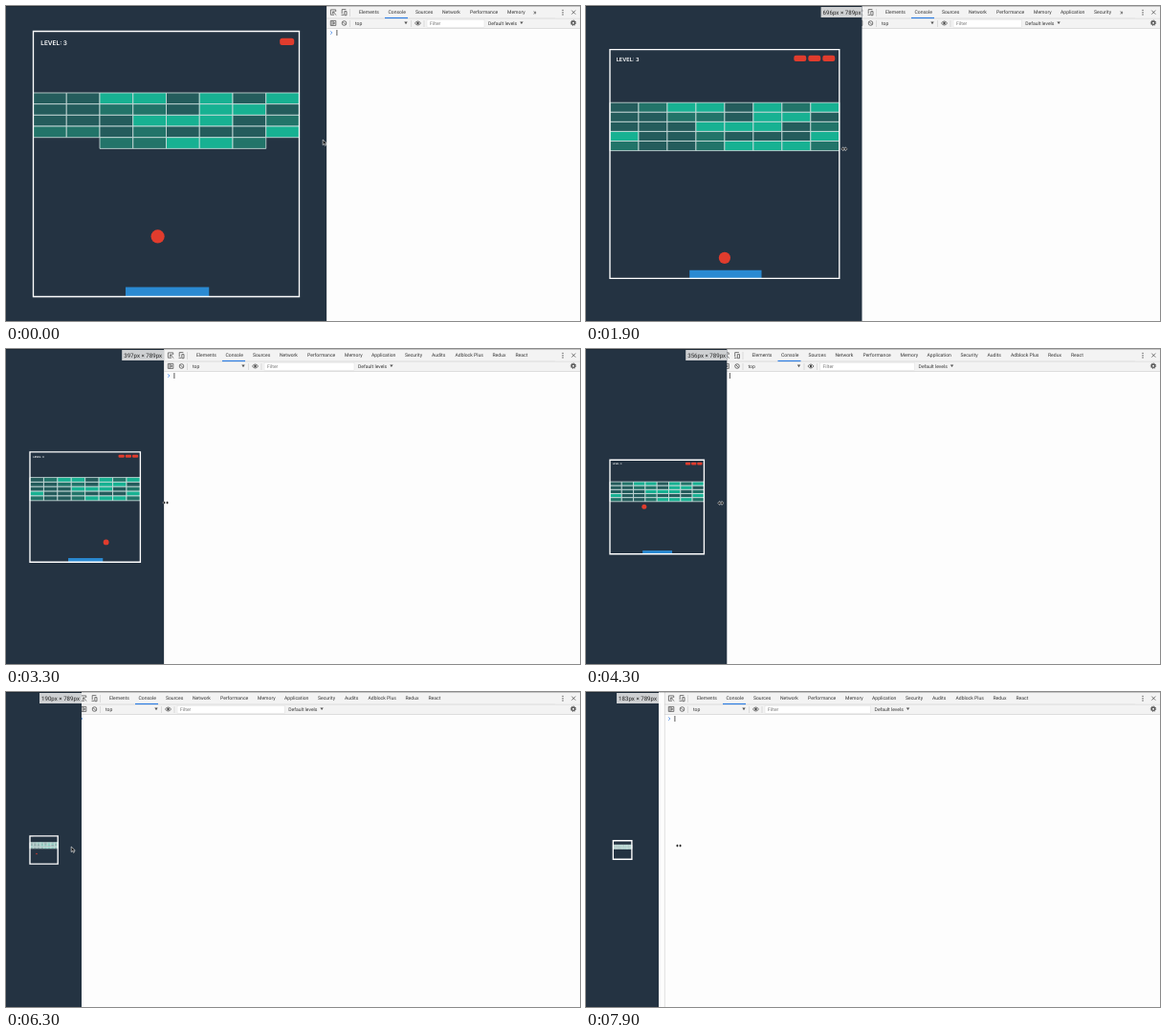
An HTML page for the animation above (8 s loop, 600 px wide and 330 px high).

```html
<!DOCTYPE html>
<html lang="en">
<head>
<meta charset="utf-8">
<title>Resizing a brick game</title>
<style>
  html, body { margin: 0; width: 100%; height: 100%; overflow: hidden; background: #fff; }
  svg { display: block; }
  text { font-family: Roboto, "Liberation Sans", sans-serif; text-rendering: geometricPrecision; white-space: pre; }
  .ui { font-size: 5.05px; fill: #333; }
  .icon { fill: none; stroke: #555; stroke-width: .8; }
  .thin { stroke: #ccc; stroke-width: .6; }
  .brick { stroke: #d3e4e2; stroke-width: .8; vector-effect: non-scaling-stroke; }
  .h0 { display: none; }
  .h1 { fill: #245c5c; }
  .h2 { fill: #227469; }
  .h3 { fill: #17b192; }
  .red { fill: #e03c2d; }
  .level { font: 600 2.35px Inter, "Open Sans", sans-serif; fill: #fff; }
</style>
</head>
<body>
<svg id="stage" width="600" height="330" viewBox="0 0 600 330">
  <rect width="600" height="330" fill="#fdfdfd"/>

  <g id="tools">
    <rect width="600" height="23.5" fill="#f3f3f3"/>
    <path class="thin" d="M0 13H600M0 23.5H600M.3 0V330M24.5 3V11M24.5 15V22M88.5 15V22M102 15V22"/>
    <rect x="61" y="11.9" width="24" height="1.2" fill="#2f7de1"/>
    <g class="icon">
      <path d="M8 9.2H4.4V3.9H9.7V6M6.6 6L10.3 9.6M6.6 8.3V6H8.9"/>
      <path d="M16.2 8V3.6H20.4M15.5 9.3H18M18.8 5.6H21V9.7H18.8Z"/>
      <path d="M4.3 15.4H9.8V20.4H4.3ZM6 15.4V20.4M7.3 16.7L8.8 17.9L7.3 19.1Z"/>
      <circle cx="18.5" cy="18" r="2.3"/><path d="M16.9 16.4L20.1 19.6"/>
      <path d="M92.4 18Q95.5 14 98.6 18Q95.5 22 92.4 18Z"/>
    </g>
    <circle cx="95.5" cy="18" r="1.2" fill="#444"/>
    <text class="ui" x="30" y="19.7">top</text>
    <path d="M81.3 16.6H84.7L83 19.3Z" fill="#555"/>
    <rect id="filter" x="105" y="14.2" height="8" fill="#fff" stroke="#ddd" stroke-width=".5"/>
    <text class="ui" x="108" y="19.7" style="fill:#757575">Filter</text>
    <g id="levels">
      <text class="ui" y="19.5">Default levels</text>
      <path d="M33.2 16.5H36.6L34.9 19.1Z" fill="#555"/>
    </g>
    <path d="M4.2 26.3L5.9 28L4.2 29.7" fill="none" stroke="#3b82e8" stroke-width=".8"/>
    <path id="caret" d="M10.9 25V31" stroke="#333" stroke-width=".8"/>
    <g id="tabs"></g>
  </g>

  <rect x="574" y="1" width="26" height="11.5" fill="#f3f3f3"/>
  <g fill="#555">
    <circle cx="582" cy="4.4" r=".7"/><circle cx="582" cy="6.7" r=".7"/><circle cx="582" cy="9" r=".7"/>
  </g>
  <g class="icon">
    <path d="M591.3 4.6L595.3 8.6M595.3 4.6L591.3 8.6"/>
    <circle cx="593" cy="17.7" r="1.7" stroke-width="1.3"/>
    <circle cx="593" cy="17.7" r="2.7" stroke-dasharray="1.06" stroke-width="1"/>
  </g>

  <svg id="page" height="330">
    <rect width="600" height="330" fill="#243342"/>
    <g id="game">
      <g id="bricks"></g>
      <text class="level" x="2.8" y="5.1">LEVEL: 3</text>
      <g id="lives" class="red"></g>
      <rect id="paddle" x="34.7" y="96.4" width="31.4" height="3.6" fill="#2a8ad2"/>
      <circle id="ball" class="red" r="2.55"/>
      <rect width="100" height="100" fill="none" stroke="#fff" stroke-width="1.35" vector-effect="non-scaling-stroke"/>
    </g>
    <g id="label">
      <rect y="1" width="45" height="11" fill="#cfd1d3"/>
      <text id="dims" x="2" y="9" font-size="6.15" fill="#222"></text>
    </g>
  </svg>

  <rect width="600" height="1" fill="#000" opacity=".2"/>
  <g id="mouse">
    <path id="arrow" d="M-1.3 -3V2.6L0 1.4L1 3.4L2 2.9L1.1 1H2.8Z" fill="#111" stroke="#fff" stroke-width=".6"/>
    <path id="resize" d="M-3.2 0L-1 -2V-.6H1V-2L3.2 0L1 2V.6H-1V2Z" fill="#111" stroke="#fff" stroke-width=".5"/>
  </g>
</svg>

<script>
const LOOP = 8000, STEP = 100, MAX_SIZE = 278, MARGIN = 50;
const $ = id => document.getElementById(id);

function add(parent, tag, attrs, text = "") {
  const el = document.createElementNS("http://www.w3.org/2000/svg", tag);
  for (const key in attrs) el.setAttribute(key, attrs[key]);
  el.textContent = text;
  return parent.appendChild(el);
}
const move = (id, x, y = 0, s = 1) => $(id).setAttribute("transform", `translate(${x} ${y}) scale(${s})`);
const show = (el, on) => { el.style.display = on ? "" : "none"; };

// Linear track through [time, value, value...] points; equal times make a jump.
function at(track, t) {
  let i = track.findIndex(p => p[0] > t);
  if (i < 0) return track[track.length - 1].slice(1);
  if (i === 0) return track[0].slice(1);
  const a = track[i - 1], b = track[i], k = (t - a[0]) / (b[0] - a[0]);
  return a.slice(1).map((v, j) => v + (b[j + 1] - v) * k);
}

// Tools edge, layout width and painted page edge follow the mouse with growing lag.
const toolsEdge = [[0, 335], [700, 335], [1000, 331], [1300, 322], [2500, 236], [3200, 165],
  [3700, 165], [4500, 131], [5100, 108], [5400, 102], [6300, 74], [7100, 59], [7300, 62], [7900, 82]];
const layoutWidth = [[0, 335], [1000, 335], [1300, 329.2], [2500, 250.4], [3250, 165.4], [3800, 165.4],
  [5100, 121.25], [6300, 79.2], [7200, 61.5], [7350, 61.5], [7900, 76.25]];
const pageEdge = [[0, 335], [1000, 335], [1300, 329], [2500, 248], [3250, 165], [3800, 165],
  [5100, 119], [6300, 79], [7200, 61], [7350, 61], [7900, 76]];
const mousePath = [[0, 332.5, 143], [700, 332.5, 143], [1300, 317.5, 148.5], [2500, 222.5, 151], [3200, 167, 161],
  [3700, 167, 161], [5100, 106, 162], [6300, 69.5, 165], [7100, 58, 163], [7900, 97, 161]];
const ballPath = [[0, 46.8, 77.3], [1300, 40.5, 93.6], [1500, 39.5, 91], [1500, 50, 91], [2000, 50, 91],
  [2500, 57.8, 83.7], [2700, 61, 80.8], [2700, 50, 91], [2900, 50, 91], [3300, 69, 82], [3750, 96, 69],
  [4350, 31, 48], [5100, 73, 72], [5450, 93, 83], [5450, 50, 91], [6300, 24, 64], [6750, 8, 48], [7900, 50, 91]];

const worn = "1133131311221331111333122212111300223320";
const fresh = "1233132311221331111333123112111321123332";
const hit = fresh.slice(0, 34) + "0" + fresh.slice(35);

const bricks = [...worn].map((_, i) => add($("bricks"), "rect",
  { x: i % 8 * 12.5, y: 23.2 + Math.floor(i / 8) * 4.2, width: 12.5, height: 4.2 }));
const lives = [0, 1, 2].map(i => add($("lives"), "rect",
  { x: 92.7 - i * 6.25, y: 2.6, width: 5.4, height: 2.6, rx: .9 }));

const tabs = [["Elements", 34, 55], ["Console", 64.5, 83], ["Sources", 93, 112], ["Network", 121, 141],
  ["Performance", 150, 179], ["Memory", 189, 208], ["Application", 217, 243], ["Security", 252, 271],
  ["Audits", 280, 294], ["Adblock Plus", 304.5, 334], ["Redux", 343.5, 358], ["React", 367.5, 381.5]]
  .map(([name, x, end]) => ({ x, end, el: add($("tabs"), "text", { class: "ui", x, y: 8.4 }, name) }));
const more = add($("tabs"), "text", { class: "ui", y: 8.6, style: "font-size:7.5px" }, "»");

function drawTools(t) {
  const [edge] = at(toolsEdge, t);
  move("tools", edge);
  const levelsX = 169 + (335 - edge) * .2;
  move("levels", levelsX);
  $("filter").setAttribute("width", levelsX - 109);
  show($("caret"), t % 1060 < 530);
  let hidden = tabs.findIndex(tab => edge + tab.end > 558);
  if (hidden < 0) hidden = tabs.length;
  tabs.forEach((tab, i) => show(tab.el, i < hidden));
  show(more, hidden < tabs.length);
  if (hidden < tabs.length) more.setAttribute("x", tabs[hidden].x - 1);
}

function drawGame(t) {
  const [width] = at(layoutWidth, t), [earlier] = at(layoutWidth, t - 250);
  const base = t > 7200 ? Math.min(width, earlier) : width;
  const size = Math.min(MAX_SIZE, base - MARGIN);
  const reset = t >= 1500;
  $("page").setAttribute("width", at(pageEdge, t)[0]);
  move("game", (width - size) / 2, 165.5 - size / 2, size / 100);
  const wall = !reset ? worn : t >= 4350 && t < 5450 ? hit : fresh;
  bricks.forEach((b, i) => b.setAttribute("class", "brick h" + wall[i]));
  lives.forEach((l, i) => show(l, (reset || i === 0) && size > 40));
  const [x, y] = at(ballPath, t);
  move("ball", x, y);
  show($("ball"), size > 22);
  show($("paddle"), size > 34);
  show($("label"), t >= 1000);
  move("label", width - 44.2);
  $("dims").textContent = `${Math.round(width * 2.4)}px × 789px`;
}

function drawMouse(t) {
  const arrow = t < 1900 || (t > 5800 && t < 6800);
  move("mouse", ...at(mousePath, t));
  show($("arrow"), arrow);
  show($("resize"), !arrow);
}

function frame() {
  const t = Math.floor(performance.now() % LOOP / STEP) * STEP;
  drawTools(t);
  drawGame(t);
  drawMouse(t);
  requestAnimationFrame(frame);
}
frame();
</script>
</body>
</html>
```
